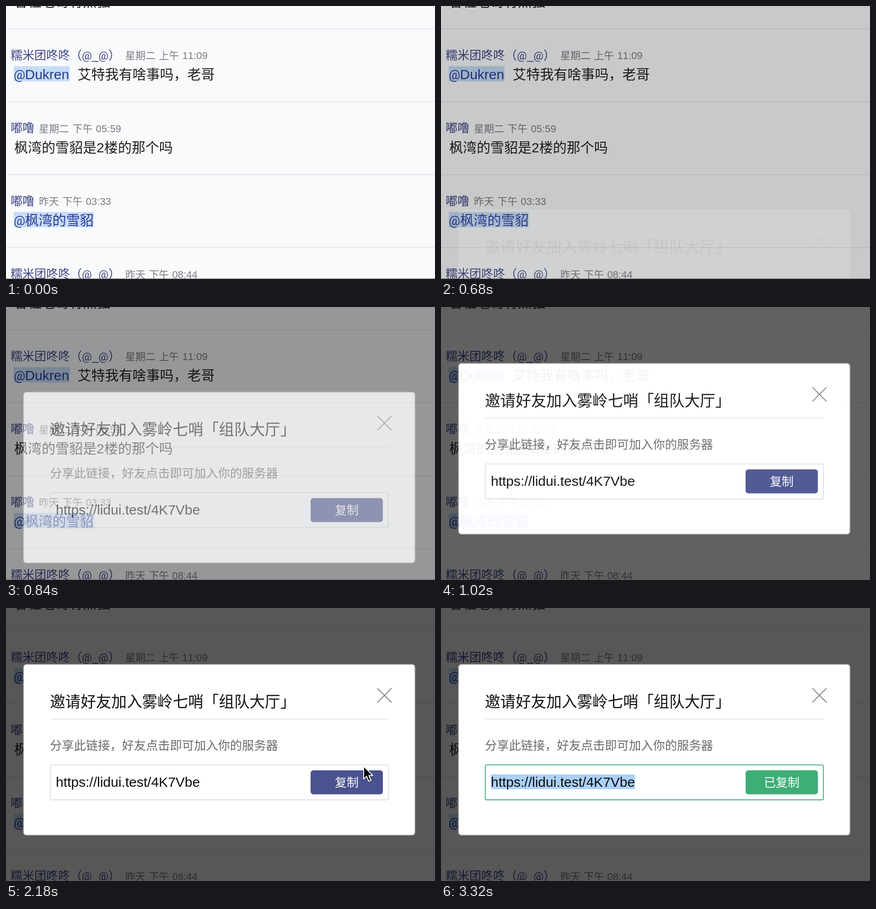
An HTML page for the animation above (3.72 s loop, 938 px wide and 597 px high).

```html
<!DOCTYPE html>
<html lang="zh-CN">
<head>
<meta charset="utf-8">
<title>邀请好友</title>
<style>
html, body { margin: 0; width: 100%; height: 100%; overflow: hidden; background: #f9fafc; }
svg { display: block; width: 938px; height: 597px; }
text {
  font-family: "Liberation Sans", "Noto Sans CJK SC", "Noto Sans CJK", sans-serif;
  font-size: 30px; fill: #1f1f20; font-kerning: none; text-spacing-trim: space-all;
}
.name { font-size: 26px; fill: #3f4785; }
.time { font-size: 22px; fill: #7b7c80; word-spacing: 1.2px; }
.tag { fill: #2c389c; }
.at { font-family: Roboto, sans-serif; font-size: .93em; }
.mark { fill: #c5def5; }
.rule { fill: #dfe2e6; }
.title { font-size: 33.6px; fill: #111; }
.hint { font-size: 26.25px; fill: #6a6a6a; }
.url { fill: #0c0c0c; }
.label { font-size: 26px; fill: #fff; text-anchor: middle; }

/* One shared 3720 ms timeline */
#modal, #card, #slide, #field, #btn, #cursor, .before, .after, #arrow, #hand {
  animation: 3720ms linear infinite both;
}
#modal { animation-name: modal; }
#slide { animation-name: slide; }
#card { animation-name: card; }
#field { animation-name: field; animation-timing-function: step-end; fill: #fff; stroke-width: 1.8; }
#btn { animation-name: btn; }
.before { animation-name: before; animation-timing-function: step-end; }
.after { animation-name: after; animation-timing-function: step-end; }
#cursor { animation-name: cursor; filter: drop-shadow(0 1px 1px rgba(0,0,0,.35)); }
#arrow { animation-name: arrow; animation-timing-function: step-end; }
#hand { animation-name: hand; animation-timing-function: step-end; }

@keyframes modal {
  0%, 13.98% { opacity: 0; }
  28.17%, 100% { opacity: 1; }
}
@keyframes slide {
  0% { transform: translateY(474px); }
  15.81% { transform: translateY(474px); animation-timing-function: ease; }
  27.63%, 100% { transform: none; }
}
@keyframes card {
  0% { opacity: 0; }
  15.32% { opacity: 0; animation-timing-function: ease-in-out; }
  25.81%, 100% { opacity: 1; }
}
@keyframes field {
  0% { stroke: #d8e1e5; }
  66.67%, 100% { stroke: #3dab72; }
}
@keyframes btn {
  0%, 66.66% { fill: #4a528f; }
  66.67%, 81.18% { fill: #4fb485; }
  89.25%, 100% { fill: #3cae76; }
}
@keyframes before {
  0% { opacity: 1; }
  66.67%, 100% { opacity: 0; }
}
@keyframes after {
  0% { opacity: 0; }
  66.67%, 100% { opacity: 1; }
}
@keyframes cursor {
  0% { transform: translate(832px, 640px); }
  47.31% { transform: translate(832px, 640px); animation-timing-function: ease-in; }
  53.23% { transform: translate(821px, 462px); animation-timing-function: ease-out; }
  58.6% { transform: translate(782px, 346px); animation-timing-function: ease-in-out; }
  63.44% { transform: translate(762px, 378px); }
  79.57% { transform: translate(762px, 378px); animation-timing-function: ease-in; }
  86.56%, 100% { transform: translate(960px, 620px); }
}
@keyframes arrow {
  0% { opacity: 1; }
  60.5% { opacity: 0; }
  82.2%, 100% { opacity: 1; }
}
@keyframes hand {
  0% { opacity: 0; }
  60.5% { opacity: 1; }
  82.2%, 100% { opacity: 0; }
}
</style>
</head>
<body>
<svg viewBox="0 0 938 597">
  <rect width="938" height="597" fill="#f9fafc"/>

  <!-- Chat -->
  <text x="18" y="1">各位老哥有点强</text>
  <g>
    <rect class="rule" y="49" width="938" height="1.4"/>
    <text class="name" x="10" y="116.5">糯米团咚咚（<tspan class="at">@</tspan>_<tspan class="at">@</tspan>）</text>
    <text class="time" x="261" y="116">星期二 上午 11:09</text>
    <rect class="mark" x="17" y="131.5" width="122" height="33.5"/>
    <text class="tag" y="160"><tspan class="at" x="17">@</tspan><tspan x="41.5">Dukren</tspan></text>
    <text x="156.5" y="160">艾特我有啥事吗，老哥</text>
  </g>
  <g transform="translate(0 159.5)">
    <rect class="rule" y="49" width="938" height="1.4"/>
    <text class="name" x="10" y="116.5">嘟噜</text>
    <text class="time" x="72" y="116">星期二 下午 05:59</text>
    <text x="18" y="160">枫湾的雪貂是2楼的那个吗</text>
  </g>
  <g transform="translate(0 319)">
    <rect class="rule" y="49" width="938" height="1.4"/>
    <text class="name" x="10" y="116.5">嘟噜</text>
    <text class="time" x="72" y="116">昨天 下午 03:33</text>
    <rect class="mark" x="17" y="131.5" width="175" height="33.5"/>
    <text class="tag" y="160"><tspan class="at" x="17">@</tspan><tspan x="41.5">枫湾的雪貂</tspan></text>
  </g>
  <g transform="translate(0 478.5)">
    <rect class="rule" y="49" width="938" height="1.4"/>
    <text class="name" x="10" y="116.5">糯米团咚咚（<tspan class="at">@</tspan>_<tspan class="at">@</tspan>）</text>
    <text class="time" x="261" y="116">昨天 下午 08:44</text>
  </g>

  <!-- Invite dialog: the mask and the card fade in together -->
  <g id="modal">
    <rect width="938" height="597" fill-opacity=".65"/>
    <g id="slide">
      <g id="card">
        <rect x="38.5" y="123.5" width="855.5" height="373" rx="6" fill="#fff" stroke="#b9bbbb" stroke-width="1.6"/>
        <text class="title" x="96" y="216.5">邀请好友加入雾岭七哨「组队大厅」</text>
        <path d="M812 175.5L843 206.5M843 175.5L812 206.5" stroke="#858585" stroke-width="2"/>
        <rect class="rule" x="96" y="242.3" width="741" height="1.5"/>
        <text class="hint" x="96" y="310">分享此链接，好友点击即可加入你的服务器</text>
        <rect id="field" x="96.7" y="343.2" width="739.3" height="76.3" rx="3"/>
        <rect class="after" x="109" y="364" width="315" height="32" fill="#abd0fb"/>
        <text class="url" x="109" y="391">https://lidui.test/4K7Vbe</text>
        <rect id="btn" x="666" y="355" width="158" height="52.5" rx="6"/>
        <text class="label before" x="745" y="390.5">复制</text>
        <text class="label after" x="745" y="390.5">已复制</text>
      </g>
    </g>
  </g>

  <!-- Pointer -->
  <g id="cursor" stroke-linejoin="round">
    <path id="arrow" d="M0 0V28L6.5 22L11 33L16 31L11.5 20.5H20Z" stroke="#fff" stroke-width="2"/>
    <g id="hand">
      <g transform="translate(-9 -2)" stroke="#000" stroke-width="1.8" stroke-linecap="round">
        <path fill="#fff" d="M7 5c-1-3 3-5 4.5-2l3 9c1-2 4-1.5 4.5 .5c1-1.5 4-1 4 1c2-1 3.5 0 3.5 2.5v5c0 3-2 5-2 9h-11c-1-4-6-8-9-12c-2-3 1-5 4-2l2 2z"/>
        <path fill="none" d="M15.5 20v6M19 20v6M22.5 20v6"/>
      </g>
    </g>
  </g>

  <rect y="596" width="938" height="1" fill="#5c5c5c"/>
</svg>
</body>
</html>
```
